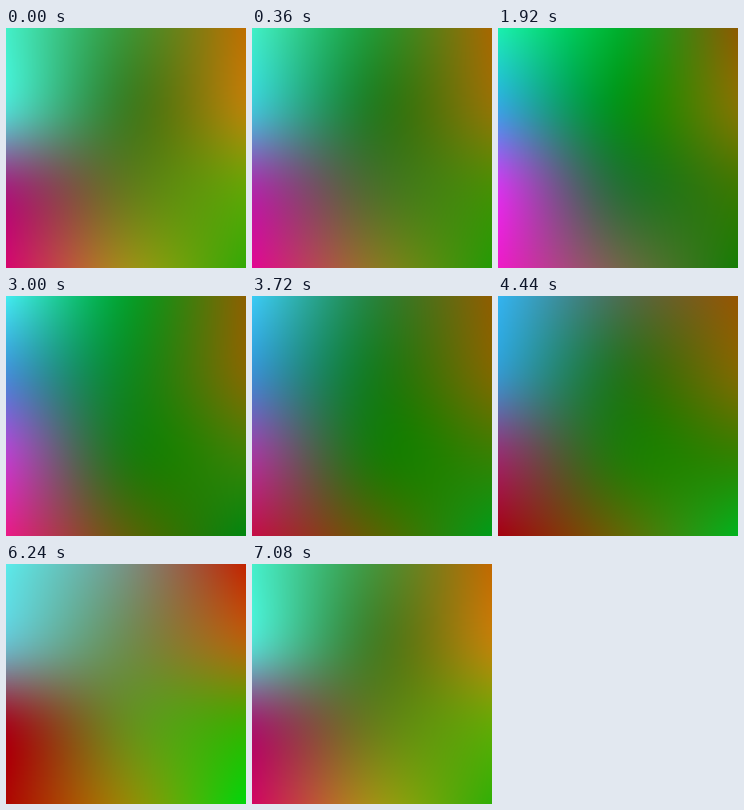
Animation of 300 by 300 pixels, one loop 7200 ms. Source, as an HTML page with a canvas:

```html
<!DOCTYPE html>
<html lang="en">
<head>
<meta charset="utf-8">
<title>Colour drift</title>
<style>
  html, body { margin: 0; width: 100%; height: 100%; overflow: hidden; }
  canvas { display: block; width: 300px; height: 300px; }
</style>
</head>
<body>
<canvas id="stage" width="300" height="300"></canvas>
<script>
const SIZE = 300, LOOP = 7200, STEP = 120;
const COLS = 3, ROWS = 4;

// Each pose: colours at left, middle and right, for four rows from top to bottom.
const poses = [
  { at: 0, colours: "42f0c8 3c9637 be6e00  50dcd2 3c7d23 b98208  a5207d 64781e 64a505  d7056e a08c19 32aa05" },
  { at: 960, colours: "3cf0c8 00a041 7d4b00  2d96e1 007d28 4b5500  be3ceb 235f46 0f6900  f00abe 694b3c 008705" },
  { at: 1920, colours: "19f0af 00af2d 8c5a00  37a5e1 059119 827300  d237eb 286e37 3c7800  f019c8 73644b 147d05" },
  { at: 3000, colours: "41ebf0 05a02d 8c5f00  468cd7 0f8723 826900  b941cd 1e7814 3c8205  eb1987 5f5f0a 00870f" },
  { at: 4440, colours: "32b4f0 4b6e52 965500  3796cd 23731e 7d6900  962d6e 23780a 328200  a5000f 646405 00b41e" },
  { at: 6240, colours: "5aebeb 789182 c32300  69becd 6e8c50 b4640a  a50a1e 698c1e 3caf00  af0500 968705 00d70a" }
].map(({ at, colours }) => ({ at, mesh: colours.split(/\s+/).map(toRgb) }));

function toRgb(hex) {
  const n = parseInt(hex, 16);
  return [n >> 16, n >> 8 & 255, n & 255];
}

function hermite(a, b, slopeA, slopeB, u) {
  const v = u * u, w = v * u;
  return a * (2 * w - 3 * v + 1) + b * (3 * v - 2 * w)
    + slopeA * (w - 2 * v + u) + slopeB * (w - v);
}

// Smooth curve through evenly spaced values, u from 0 to 1.
function spline(values, u) {
  const last = values.length - 1;
  const i = Math.min(last - 1, Math.floor(u * last));
  const a = values[i], b = values[i + 1];
  const before = i > 0 ? values[i - 1] : 2 * a - b;
  const after = i + 2 <= last ? values[i + 2] : 2 * b - a;
  return hermite(a, b, (b - before) / 2, (after - a) / 2, u * last - i);
}

// Poses repeat endlessly in both directions.
function poseAt(index) {
  const n = poses.length, turn = Math.floor(index / n);
  const pose = poses[index - turn * n];
  return { at: pose.at + turn * LOOP, mesh: pose.mesh };
}

function meshAt(time) {
  let i = poses.length - 1;
  while (poses[i].at > time) i--;
  const [p, a, b, q] = [-1, 0, 1, 2].map(d => poseAt(i + d));
  const span = b.at - a.at;
  const u = (time - a.at) / span;
  return a.mesh.map((rgb, k) => rgb.map((value, c) => {
    const next = b.mesh[k][c];
    const slopeA = (next - p.mesh[k][c]) / (b.at - p.at) * span;
    const slopeB = (q.mesh[k][c] - value) / (q.at - a.at) * span;
    return hermite(value, next, slopeA, slopeB, u);
  }));
}

const ctx = document.getElementById("stage").getContext("2d");
const image = ctx.createImageData(SIZE, SIZE);
image.data.fill(255);

function paint(time) {
  const mesh = meshAt(time);
  for (let c = 0; c < 3; c++) {
    const columns = Array.from({ length: COLS }, (_, x) =>
      Array.from({ length: ROWS }, (_, y) => mesh[y * COLS + x][c]));
    for (let y = 0; y < SIZE; y++) {
      const row = columns.map(column => spline(column, y / (SIZE - 1)));
      for (let x = 0; x < SIZE; x++) {
        image.data[(y * SIZE + x) * 4 + c] = spline(row, x / (SIZE - 1));
      }
    }
  }
  ctx.putImageData(image, 0, 0);
}

const start = performance.now();
let shown = -1;

function tick() {
  const elapsed = (performance.now() - start) % LOOP;
  const time = Math.floor(elapsed / STEP) * STEP;
  if (time !== shown) paint(shown = time);
  requestAnimationFrame(tick);
}
tick();
</script>
</body>
</html>
```
